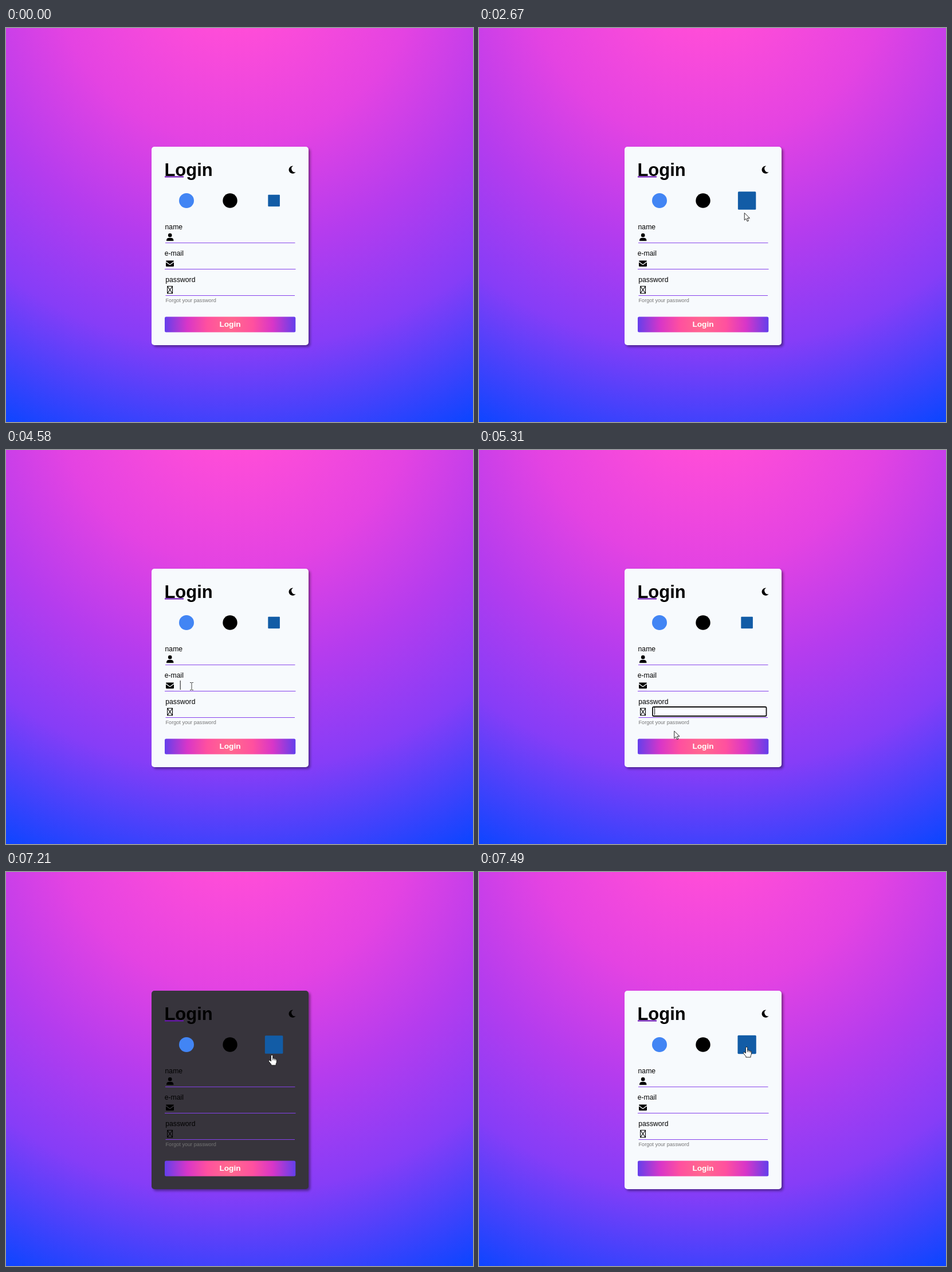
Write an HTML page that moves like this. It is 815 px wide and 687 px high and loops after 8000 ms.

```html
<!DOCTYPE html>
<html lang="en">
<head>
<meta charset="utf-8">
<title>Login form</title>
<style>
html, body { margin: 0; width: 100%; height: 100%; overflow: hidden; }
svg { display: block; width: 815px; height: 687px; font-family: "Liberation Sans", Arial, sans-serif; }
.label { font-size: 12.2px; }
.line { stroke: #8540ec; stroke-width: 1; }
.caret { stroke: #111; stroke-width: 1; }
.cursor { fill: #fff; stroke: #111; stroke-width: .9; stroke-linejoin: round; }
</style>
</head>
<body>
<svg viewBox="0 0 815 687">
  <defs>
    <radialGradient id="sky" gradientUnits="userSpaceOnUse" cx="400" cy="-120" r="902">
      <stop offset=".13" stop-color="#ff4dd8"/>
      <stop offset=".355" stop-color="#e443e2"/>
      <stop offset=".555" stop-color="#b53cee"/>
      <stop offset=".755" stop-color="#863df7"/>
      <stop offset="1" stop-color="#0d45ff"/>
    </radialGradient>
    <radialGradient id="glow" gradientUnits="userSpaceOnUse" cx="391" cy="517" r="115">
      <stop offset="0" stop-color="#ff6c8c"/>
      <stop offset=".35" stop-color="#ff509f"/>
      <stop offset=".65" stop-color="#d836c8"/>
      <stop offset="1" stop-color="#623fec"/>
    </radialGradient>
    <filter id="blur" x="-10%" y="-10%" width="120%" height="120%"><feGaussianBlur stdDeviation="2"/></filter>
  </defs>
  <rect width="815" height="687" fill="url(#sky)"/>
  <rect x="257" y="210" width="274" height="346" rx="5" fill="#000" opacity=".4" filter="url(#blur)"/>
  <rect id="card" x="254" y="207" width="274" height="346" rx="5"/>

  <rect x="277" y="258.4" width="33" height="2.1" fill="#6a12b4"/>
  <text x="276.4" y="258" font-size="31" font-weight="bold">Login</text>
  <path d="M501 240.5A6.7 6.7 0 1 0 505.6 251.2A5.9 5.9 0 0 1 501 240.5Z"/>

  <g id="icons">
    <circle r="13" fill="#4285f4"/>
    <circle r="12.7"/>
    <rect x="-10.3" y="-10.3" width="20.6" height="20.6" rx="1" fill="#125ca6"/>
  </g>

  <g class="label">
    <text x="277.6" y="351">name</text>
    <text x="276.7" y="397">e-mail</text>
    <text x="278.3" y="442.5">password</text>
  </g>
  <circle cx="286.2" cy="361.4" r="3.3"/>
  <path d="M280 371.3v-1a4.6 4.6 0 0 1 4.6-4.4h3.2a4.6 4.6 0 0 1 4.6 4.4v1Z"/>
  <path d="M279 406.8q0-1.4 1.4-1.4h11.2q1.4 0 1.4 1.4l-7 5.2ZM279 408.4l7 5.2 7-5.2v6.3q0 1.4-1.4 1.4h-11.2q-1.4 0-1.4-1.4Z"/>
  <path d="M281.7 450.2h8.8v12.5h-8.8ZM281.7 450.2l8.8 12.5M290.5 450.2l-8.8 12.5" fill="none" stroke="#000" stroke-width="1.1"/>
  <path class="line" d="M278 374.7H504.5M277 420.5H505.5M278.5 466.5H504"/>
  <text x="278.5" y="478" font-size="9.15" fill="#757575">Forgot your password</text>

  <rect id="focus" x="303" y="448" width="198.5" height="16" rx="2" fill="#fafcff" stroke="#101010" stroke-width="1.8"/>
  <g class="caret" id="carets">
    <path d="M304.2 356v16"/>
    <path d="M304.2 402v16"/>
    <path d="M306.6 449v13"/>
  </g>

  <rect x="277" y="503.5" width="228.3" height="27" rx="2.5" fill="url(#glow)"/>
  <text x="391" y="521.3" font-size="13.7" font-weight="bold" fill="#fff" text-anchor="middle">Login</text>

  <g id="pointer">
    <circle id="halo" cx="-1" cy="-1" r="9.2" fill="#f0ee48" opacity=".75"/>
    <path id="arrow" class="cursor" d="M0 0V12.6l2.9-2.7 2 4.7 2.2-.9-2-4.6h4.1Z"/>
    <path id="hand" class="cursor" d="M-1.6 1.6a1.6 1.6 0 0 1 3.2 0V6.5a1.4 1.4 0 0 1 2.6.3 1.4 1.4 0 0 1 2.4.6 1.3 1.3 0 0 1 1.7 1.3V12q0 2-1.2 3.4V18H-1.2V16.4L-5.4 11.2a1.4 1.4 0 0 1 2.2-1.7l1.6 1.6ZM1.6 6.5V9M4.2 7V9.3M6.6 7.6V9.6"/>
    <path id="beam" d="M-3-6.5h2.2l.8.8.8-.8H3M-3 6.5h2.2l.8-.8.8.8H3M0-5.7V5.7" fill="none" stroke="#444" stroke-width="1"/>
  </g>
</svg>
<script>
const LOOP = 8000, ENTER = 500, BLUR = 6200, BLINK = 520, HOVER = 180;
const $ = id => document.getElementById(id);
const clamp = v => Math.max(0, Math.min(1, v));
const ease = k => k * k * (3 - 2 * k);
const mix = (a, b, k) => a.map((v, i) => v + (b[i] - v) * k);
const show = (el, on) => el.setAttribute('visibility', on ? 'visible' : 'hidden');

// bend pushes the middle of a move sideways
const moves = [
  { from: ENTER, to: 1260, at: [316, 303], bend: 90 },
  { from: 1260, to: 2100, at: [418, 302] },
  { from: 2150, to: 2370, at: [467, 307] },
  { from: 2570, to: 3230, at: [318, 388], bend: -60 },
  { from: 3390, to: 3550, at: [317, 374] },
  { from: 3890, to: 4210, at: [324, 412] },
  { from: 4580, to: 4800, at: [342, 458] },
  { from: 4900, to: 5610, at: [340, 510] },
  { from: 6250, to: 6560, at: [392, 516] },
  { from: 6700, to: 7280, at: [467, 311] },
  { from: 7310, to: 7490, at: [467, 305] }
];
const icons = [
  { x: 315, hovers: [[1140, 1480]] },
  { x: 391, hovers: [[1680, 2160]] },
  { x: 467.6, hovers: [[2240, 2640], [7060, LOOP * 2]] }
];
const focusTimes = [3560, 4400, 4880, BLUR];

function place(t) {
  let p = [250, 662];
  for (const { from, to, at, bend = 0 } of moves) {
    if (t <= from) break;
    const k = ease(clamp((t - from) / (to - from)));
    const dx = at[0] - p[0], dy = at[1] - p[1];
    const side = bend * Math.sin(Math.PI * k) / Math.hypot(dx, dy);
    const q = mix(p, at, k);
    p = [q[0] - dy * side, q[1] + dx * side];
  }
  return p;
}

const grow = (t, spans) => spans.reduce((sum, [a, b]) =>
  sum + ease(clamp((t - a) / HOVER)) - ease(clamp((t - b) / HOVER)), 0);

function drawPointer(t) {
  const [x, y] = place(t);
  const beam = x > 298 && x < 502 && [355, 401, 447].some(top => y >= top && y < top + 19.5);
  const overIcon = icons.some(i => i.hovers.some(([a, b]) => t >= a && t < b));
  const hand = overIcon || (y > 503.5 && y < 530);
  const on = t >= ENTER && y < 670;
  const age = Math.min(...focusTimes.map(f => t < f ? LOOP : t - f));
  $('pointer').setAttribute('transform', `translate(${x} ${y})`);
  show($('beam'), on && beam);
  show($('hand'), on && hand && !beam);
  show($('arrow'), on && !hand && !beam);
  show($('halo'), age < (t < focusTimes[1] ? 330 : 120));
}

function draw(t) {
  const dim = clamp((t - 7150) / 60) * (1 - clamp((t - 7225) / 265));
  $('card').setAttribute('fill', `rgb(${mix([247, 250, 253], [55, 52, 60], dim).map(Math.round)})`);

  icons.forEach(({ x, hovers }, i) =>
    $('icons').children[i].setAttribute('transform',
      `translate(${x} 301) scale(${1 + .57 * grow(t, hovers)})`));

  [...$('carets').children].forEach((el, i) => {
    const age = t - focusTimes[i];
    show(el, age >= 0 && t < focusTimes[i + 1] && age % (2 * BLINK) < BLINK);
  });
  show($('focus'), t >= focusTimes[2] && t < BLUR);
  drawPointer(t);
}

const start = performance.now();
function tick(now) {
  draw(Math.max(0, now - start) % LOOP);
  requestAnimationFrame(tick);
}
draw(0);
requestAnimationFrame(tick);
</script>
</body>
</html>
```
